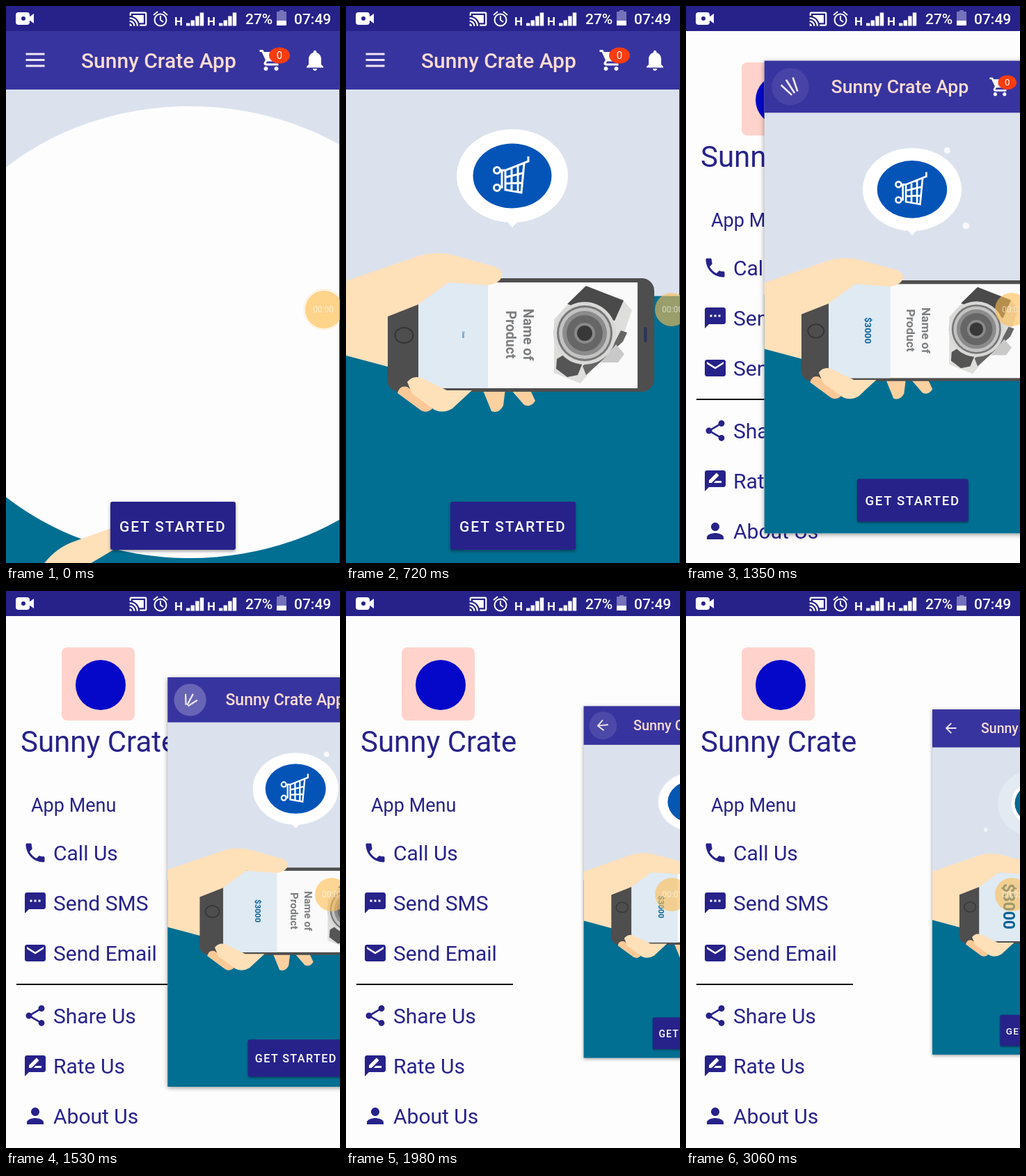
These frames come from a looping animation (480 px wide and 800 px high, 3150 ms). An HTML page:

```html
<!DOCTYPE html>
<html lang="en">
<head>
<meta charset="utf-8">
<title>Store app drawer</title>
<style>
html, body { margin: 0; width: 100%; height: 100%; overflow: hidden; background: #fdfdfd; }
svg { display: block; width: 100%; height: 100%; }
text { font-family: Roboto, sans-serif; }
.mid { font-weight: 500; }
.navy { fill: #27228a; }
#card { filter: drop-shadow(0 2px 4px rgba(0,0,0,.4)); }
#button { filter: drop-shadow(0 2px 2px rgba(0,0,0,.4)); }
</style>
</head>
<body>
<svg viewBox="0 0 480 800">
  <rect width="480" height="800" fill="#fdfdfd"/>

  <g id="menu" class="navy">
    <rect x="80" y="81" width="105" height="105" rx="8" fill="#ffd3cc"/>
    <circle cx="136" cy="135" r="36" fill="#0508c8"/>
    <text x="21" y="231" font-size="42">Sunny Crate</text>
    <text x="36" y="317" font-size="27">App Menu</text>
    <rect x="15" y="564" width="225" height="2" fill="#000"/>
  </g>

  <g id="page">
    <rect id="card" y="36" width="480" height="764" fill="#dbe2ed"/>
    <rect id="floor" width="480" fill="#006f92"/>
    <ellipse id="flash" cx="264" cy="468.500" fill="#fdfdfd"/>

    <g id="bubble" transform="translate(239 244)">
      <ellipse id="halo" fill="#fff"/>
      <g id="ring" fill="#fff">
        <ellipse rx="80" ry="67"/>
        <path d="M-10 63L0 74 10 63Z"/>
      </g>
      <ellipse id="disc" rx="56.500" ry="46.500"/>
      <g id="cart" fill="none" stroke="#fff" stroke-width="3">
        <path d="M23-28V-21L-10-8V20L13 24 17-18M-10-8L-15-8V18M-1-11V21M8-14V23M-10 2L15-4M-10 11L14 10"/>
        <circle cx="-22" cy="-8" r="4.500"/><circle cx="-22" cy="17" r="4.500"/>
      </g>
      <circle id="dotA" r="5" fill="#fff"/>
      <circle id="dotB" r="5.500" fill="#fff"/>
      <circle id="dotC" r="4.500" fill="#fff"/>
    </g>

    <g id="phone">
      <g fill="#fdd0a0">
        <path d="M196 550H229L226 574Q220 586 209 582Z"/>
        <path d="M236 550H264L272 567Q266 577 256 573Z"/>
      </g>
      <rect x="59" y="391" width="384" height="163" rx="18" fill="#4f4e4e"/>
      <rect x="104" y="397" width="315" height="152" fill="#fafafa"/>
      <rect x="104" y="397" width="100" height="152" fill="#dfeaf3"/>
      <ellipse cx="83.500" cy="473" rx="13" ry="11" fill="none" stroke="#353535" stroke-width="2"/>
      <rect x="428" y="461" width="4.500" height="22" rx="2" fill="#2c3459"/>
      <g id="product">
        <path d="M299 450L342 403 397 421 411 437 401 466 337 542 299 527Z" fill="#dededc"/>
        <path d="M345 402L399 423 386 452 318 428Z" fill="#4a4a4a"/>
        <path d="M303 507L316 499 340 513 333 530 318 533 302 521Z" fill="#555"/>
        <path d="M340 517L384 487 395 466 404 469 398 482 345 530Z" fill="#666"/>
        <path d="M366 512L388 486 400 500 391 512Z" fill="#c9c9c9"/>
        <circle cx="343" cy="470" r="45" fill="#d8d8d6"/>
        <circle cx="343" cy="470" r="40" fill="#777"/>
        <circle cx="343" cy="470" r="37" fill="#c2c2c2"/>
        <circle cx="343" cy="470" r="32" fill="#8b8b8b"/>
        <circle cx="343" cy="470" r="26" fill="#666"/>
        <circle cx="343" cy="470" r="15" fill="#8a8a8a"/>
        <circle cx="343" cy="470" r="11" fill="#383838"/>
        <g font-weight="700" font-size="19.500" fill="#7c7e80" text-anchor="middle" transform="translate(0 472) rotate(90)">
          <text y="-255">Name of</text>
          <text y="-230">Product</text>
        </g>
      </g>
      <text id="price" font-weight="700" fill="#0b6298" text-anchor="middle" dominant-baseline="central" transform="translate(168 472) rotate(90)">$3000</text>
      <path d="M74 556Q77 544 88 547L126 576Q118 586 108 581Z" fill="#fbc997"/>
      <path d="M88 540Q97 529 110 535L145 552H181L153 578Q140 586 127 580L95 557Z" fill="#fee0b9"/>
    </g>
    <path id="hand" fill="#fee0b9" d="M0 395L98 361Q128 350 158 359L213 374Q226 379 224 388 221 399 202 401L147 397 103 429 60 446V518L0 502Z"/>

    <rect x="479" y="120" width="1" height="680" fill="#222"/>
    <rect y="36" width="480" height="84" fill="#38349f"/>
    <circle id="ripple" cx="42" cy="78" r="30" fill="#fff"/>
    <path id="burger" fill="none" stroke="#efe6f3" stroke-width="3"/>
    <text class="mid" x="108" y="88.500" font-size="30" fill="#fbdcd3">Sunny Crate App</text>
    <g id="tools" fill="#fff"></g>
    <ellipse cx="393" cy="71" rx="15" ry="11.500" fill="#fb3d10"/>
    <text x="393" y="76" font-size="15" fill="#fff" text-anchor="middle">0</text>
    <rect id="button" class="navy" x="150" y="712" width="180" height="69" rx="3"/>
    <text class="mid" x="163" y="755" font-size="21" letter-spacing="1.880" fill="#fff">GET STARTED</text>
  </g>

  <g id="status" fill="#fff">
    <rect width="480" height="36" class="navy"/>
    <rect x="14" y="9" width="20" height="18" rx="4"/>
    <path d="M33 16L40 11V25L33 20Z"/>
    <circle cx="25" cy="18" r="3" class="navy"/>
    <g fill="none" stroke="#fff" stroke-width="2">
      <circle cx="222" cy="20" r="8.500"/>
      <path d="M222 14V20L226 23M212 13L218 8M226 8L232 13"/>
    </g>
    <rect x="393" y="6" width="6" height="3" fill="#7572ba"/>
    <rect x="389" y="8" width="14" height="14" fill="#7572ba"/>
    <rect x="389" y="21" width="14" height="7"/>
    <g class="mid" font-size="21">
      <text x="344" y="26">27%</text>
      <text x="414" y="26">07:49</text>
    </g>
  </g>

  <g id="recorder">
    <circle id="glow" r="30" fill="#ffbe50"/>
    <circle id="knob" fill="#ffbe50" opacity=".6"/>
    <text id="timer" y="4" font-size="12" fill="#fff" opacity=".6"></text>
  </g>
</svg>

<script>
const LOOP = 3150, STEP = 90;
const $ = id => document.getElementById(id);
const set = (id, attrs) => {
  for (const k in attrs) $(id).setAttribute(k, attrs[k]);
};
const mix = (a, b, p) => a + (b - a) * p;

// Piecewise linear value through [time, value] points.
function along(t, ...keys) {
  if (t <= keys[0][0]) return keys[0][1];
  for (let i = 1; i < keys.length; i++) {
    const [t0, a] = keys[i - 1], [t1, b] = keys[i];
    if (t <= t1) return mix(a, b, (t - t0) / (t1 - t0));
  }
  return keys[keys.length - 1][1];
}

const bubbleSpeech = "M20 2H4c-1.1 0-1.99.9-1.99 2L2 22l4-4h14c1.1 0 2-.9 2-2V4c0-1.1-.9-2-2-2z";
const icons = {
  cart: "M7 18c-1.1 0-1.99.9-1.99 2S5.9 22 7 22s2-.9 2-2-.9-2-2-2zM1 2v2h2l3.6 7.59-1.35 2.45c-.16.28-.25.61-.25.96 0 1.1.9 2 2 2h12v-2H7.42c-.14 0-.25-.11-.25-.25l.03-.12.9-1.63h7.45c.75 0 1.41-.41 1.75-1.03l3.58-6.49A1 1 0 0 0 20 4H5.21l-.94-2H1zm16 16c-1.1 0-1.99.9-1.99 2s.89 2 1.99 2 2-.9 2-2-.9-2-2-2z",
  bell: "M12 22c1.1 0 2-.9 2-2h-4c0 1.1.9 2 2 2zm6-6v-5c0-3.07-1.64-5.64-4.5-6.32V4c0-.83-.67-1.5-1.5-1.5s-1.5.67-1.5 1.5v.68C7.63 5.36 6 7.92 6 11v5l-2 2v1h16v-1l-2-2z",
  cast: "M1 18v3h3c0-1.66-1.34-3-3-3zm0-4v2c2.76 0 5 2.24 5 5h2c0-3.87-3.13-7-7-7zm18-7H5v1.63c3.96 1.28 7.09 4.41 8.37 8.37H19V7zM1 10v2c4.97 0 9 4.03 9 9h2c0-6.08-4.93-11-11-11zM21 3H3c-1.1 0-2 .9-2 2v3h2V5h18v14h-7v2h7c1.1 0 2-.9 2-2V5c0-1.1-.9-2-2-2z",
  call: "M6.62 10.79c1.44 2.83 3.76 5.14 6.59 6.59l2.2-2.2c.27-.27.67-.36 1.02-.24 1.12.37 2.33.57 3.57.57.55 0 1 .45 1 1V20c0 .55-.45 1-1 1-9.39 0-17-7.61-17-17 0-.55.45-1 1-1h3.5c.55 0 1 .45 1 1 0 1.25.2 2.45.57 3.57.11.35.03.74-.25 1.02l-2.2 2.2z",
  sms: bubbleSpeech + "M9 11H7V9h2v2zm4 0h-2V9h2v2zm4 0h-2V9h2v2z",
  mail: "M20 4H4c-1.1 0-1.99.9-1.99 2L2 18c0 1.1.9 2 2 2h16c1.1 0 2-.9 2-2V6c0-1.1-.9-2-2-2zm0 4l-8 5-8-5V6l8 5 8-5v2z",
  share: "M18 16.08c-.76 0-1.44.3-1.96.77L8.91 12.7c.05-.23.09-.46.09-.7s-.04-.47-.09-.7l7.05-4.11c.54.5 1.25.81 2.04.81 1.66 0 3-1.34 3-3s-1.34-3-3-3-3 1.34-3 3c0 .24.04.47.09.7L8.04 9.81C7.5 9.31 6.79 9 6 9c-1.66 0-3 1.34-3 3s1.34 3 3 3c.79 0 1.5-.31 2.04-.81l7.12 4.16c-.05.21-.08.43-.08.65 0 1.61 1.31 2.92 2.92 2.92s2.92-1.31 2.92-2.92-1.31-2.92-2.92-2.92z",
  rate: bubbleSpeech + "M6 14v-2.47l6.88-6.88c.2-.2.51-.2.71 0l1.77 1.77c.2.2.2.51 0 .71L8.47 14H6zm12 0h-7.5l2-2H18v2z",
  person: "M12 12c2.21 0 4-1.79 4-4s-1.79-4-4-4-4 1.79-4 4 1.79 4 4 4zm0 2c-2.67 0-8 1.34-8 4v2h16v-2c0-2.66-5.33-4-8-4z"
};
const add = (id, markup) => $(id).insertAdjacentHTML("beforeend", markup);
const icon = (name, x, y, size = 36) =>
  `<path fill-rule="evenodd" transform="translate(${x - size / 2} ${y - size / 2}) scale(${size / 24})" d="${icons[name]}"/>`;

add("tools", icon("cart", 381, 78) + icon("bell", 444, 78));
add("status", icon("cast", 190, 18.5, 27));
for (const x of [242, 289]) {
  add("status", `<text x="${x}" y="28" font-size="17" font-weight="700">H</text>`);
  [4, 8, 14, 19].forEach((h, i) =>
    add("status", `<rect x="${x + 17 + i * 6.6}" y="${28.5 - h}" width="5.4" height="${h}"/>`));
}
[["call", "Call Us", 376], ["sms", "Send SMS", 448], ["mail", "Send Email", 520],
 ["share", "Share Us", 610], ["rate", "Rate Us", 682], ["person", "About Us", 754]]
  .forEach(([name, label, y]) =>
    add("menu", icon(name, 42, y) + `<text x="68" y="${y + 11}" font-size="30">${label}</text>`));

// Three bars that turn into a back arrow as p goes from 0 to 1.
function drawBurger(p) {
  const bar = mix(27, 17, p), shaft = mix(27, 24, p), gap = mix(8.5, -1, p);
  const angle = p * Math.PI / 4, w = bar * Math.cos(angle), h = bar * Math.sin(angle);
  set("burger", {
    d: `M${-shaft / 2 + p} 0h${shaft - 2 * p}M${-shaft / 2} ${gap}l${w} ${h}M${-shaft / 2} ${-gap}l${w} ${-h}`,
    transform: `translate(42 77.5) rotate(${-180 * (1 - p)})`
  });
}

function drawScene(t) {
  const floor = along(t, [360, 420], [990, 414]);
  set("floor", { y: floor, height: 800 - floor });

  const flash = along(t, [0, 1], [90, .62], [180, .28], [270, 0]);
  set("flash", { rx: 386 * flash, ry: 324.5 * flash });

  const away = along(t, [0, 1], [90, .6], [180, .25], [270, .05], [360, 0]);
  set("hand", { transform: `translate(${-55 * away} ${426 * away}) rotate(${-35 * away} 130 355)` });
  set("phone", { transform: `translate(0 ${450 * away})` });
  set("product", { opacity: along(t, [270, .2], [360, .34], [630, 1]) });
  set("price", { "font-size": along(t, [630, 0], [990, 12.5], [1260, 15], [1890, 15], [2520, 29], [3060, 35.5]) });

  const grow = along(t, [180, 0], [270, .6], [360, .91], [540, 1], [1900, 1], [2250, .8]);
  set("ring", { transform: `scale(${grow})` });
  const late = along(t, [1900, 0], [2430, 1]);
  set("disc", {
    transform: `scale(${along(t, [180, 0], [270, .7], [360, 1])})`,
    fill: `rgb(4,${mix(84, 106, late)},${mix(184, 148, late)})`
  });
  set("cart", { transform: `scale(${along(t, [270, 0], [360, .66], [540, 1])})` });
  const halo = along(t, [1900, 78], [2520, 88], [3060, 94]);
  set("halo", { rx: halo, ry: halo * .84, opacity: along(t, [1900, 0], [2160, .6], [2520, .42], [3060, .25]) });

  const out = along(t, [720, .8], [990, 1], [1350, 1.05], [2250, 1.15]);
  const seen = along(t, [720, 0], [900, .8], [1800, .8], [2250, 0]);
  set("dotA", { cx: 54 * out, cy: -60 * out, opacity: seen });
  set("dotB", { cx: 83 * out, cy: 56 * out, opacity: seen });
  const fly = along(t, [2160, .75], [2520, 1], [3060, 1.3]);
  set("dotC", { cx: -93 * fly, cy: 45 * fly, opacity: along(t, [2160, 0], [2340, .9], [3060, .55]) });
}

function drawDrawer(t) {
  const u = Math.min(1, Math.max(0, (t - 1238) / 1519));
  const p = 1 - (1 - u) ** 5, s = 1 - .351 * p;
  set("page", { transform: `translate(${354 * p} ${418 * (1 - s)}) scale(${s})` });
  set("ripple", { opacity: along(t, [1250, 0], [1350, .08], [1710, .4], [2070, 0]) });
  drawBurger(p);
}

function drawRecorder(t) {
  const docked = along(t, [0, 0], [180, 1]);
  set("recorder", { transform: `translate(${mix(457, 468, docked)} 436)` });
  set("knob", { r: mix(27, 24, docked) });
  set("glow", { opacity: .15 * (1 - docked) });
  set("timer", { x: mix(-16, -14, docked) });
  $("timer").textContent = "00:0" + Math.floor(t / 1050);
}

function frame() {
  const t = Math.floor(performance.now() % LOOP / STEP) * STEP;
  drawScene(t);
  drawDrawer(t);
  drawRecorder(t);
  requestAnimationFrame(frame);
}
frame();
</script>
</body>
</html>
```
